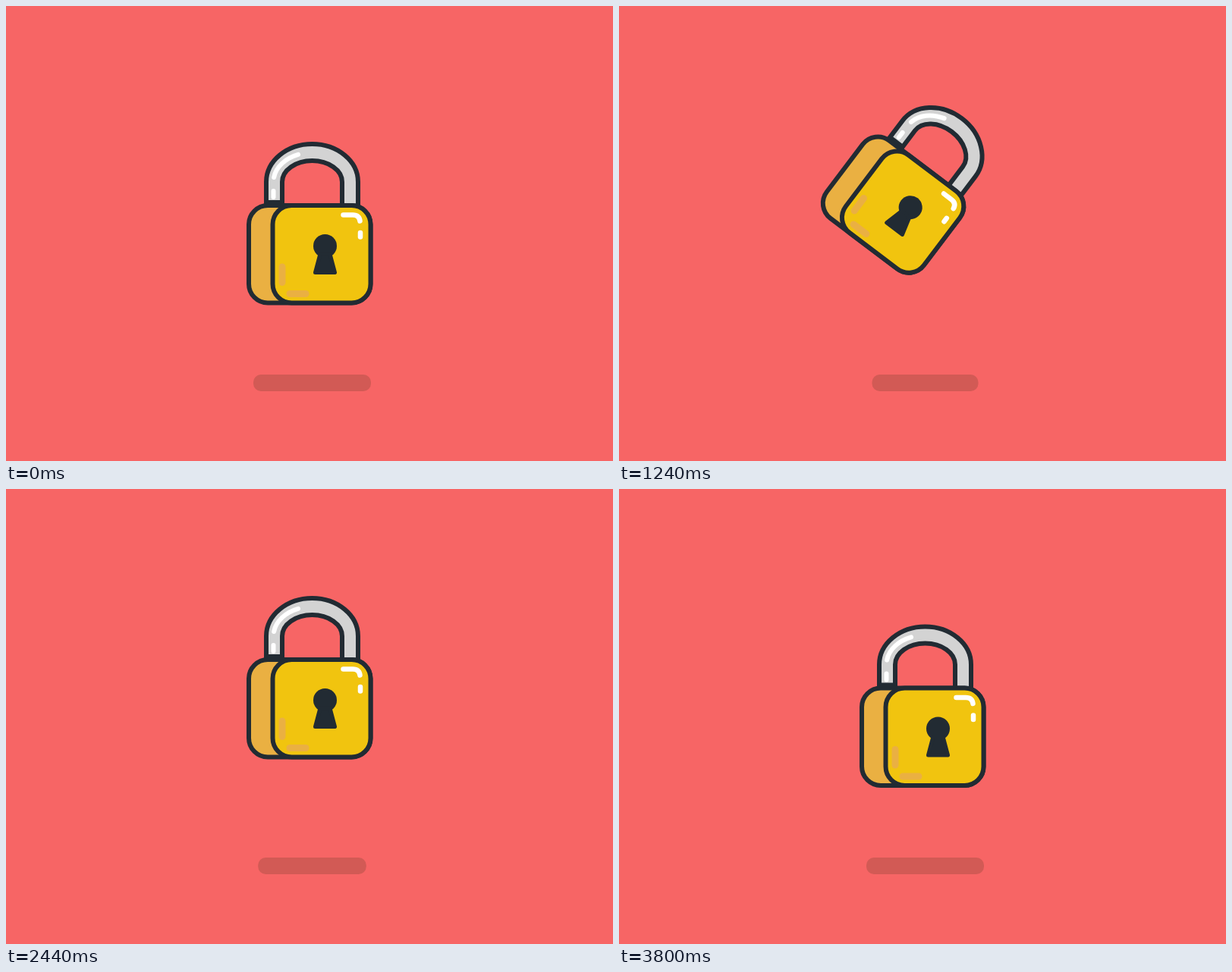
Recreate the animation shown at these times as an HTML page with a canvas. Size 800 px wide and 600 px high, loop 3840 ms.

```html
<!DOCTYPE html>
<html lang="en">
<head>
<meta charset="utf-8">
<title>Padlock</title>
<style>
  html, body { margin: 0; width: 100%; height: 100%; overflow: hidden; background: #f76565; }
  canvas { display: block; }
</style>
</head>
<body>
<canvas id="stage" width="800" height="600"></canvas>
<script>
const ctx = document.getElementById('stage').getContext('2d');
const LOOP = 3840, STEP = 40;
const INK = '#222b33', GOLD = '#f1c40f', AMBER = '#eab042', STEEL = '#d3d3d3', SHADOW = '#d25a55';

const clamp = u => Math.min(1, Math.max(0, u));
const ease = u => (1 - Math.cos(Math.PI * clamp(u))) / 2;
const rad = deg => deg * Math.PI / 180;

// Smooth curve through [time, value] keys that never overshoots them.
function track(...keys) {
  const slope = keys.slice(1).map((k, i) => (k[1] - keys[i][1]) / (k[0] - keys[i][0]));
  const tangent = keys.map((_, i) => {
    const a = slope[i - 1], b = slope[i];
    return a * b > 0 ? 2 * a * b / (a + b) : 0;
  });
  return t => {
    if (t <= keys[0][0]) return keys[0][1];
    const i = keys.findIndex(k => k[0] > t) - 1;
    if (i < 0) return keys[keys.length - 1][1];
    const [t0, v0] = keys[i], [t1, v1] = keys[i + 1];
    const d = t1 - t0, u = (t - t0) / d, w = 1 - u;
    return v0 * (1 + 2 * u) * w * w + v1 * u * u * (3 - 2 * u)
      + d * u * w * (tangent[i] * w - tangent[i + 1] * u);
  };
}

const tilt = track([980, 0], [1120, 16], [1260, 38], [1460, 4], [1560, -5.6], [1690, -8.3], [2000, -2.2], [2240, 0]);
const recoil = track([1400, 0], [1560, 1.5], [1740, 4], [1990, -4.5], [2240, 0]);
const opening = track([1380, 0], [1540, 22], [1700, 22], [2000, 4.9], [2160, 0]);
const lift = track([1340, 0], [1500, 23], [1700, 23], [2000, -15], [2240, -1], [2360, 0]);
const nudge = track([1700, 0], [2000, 1.5], [2240, 0]);
const gleam = track([1380, 24], [1540, 64], [1700, 64], [2000, 51], [2300, 24]);

const height = t => 50 * (ease(t / 1090) - ease((t - 1713) / 2231));

function rotateAbout(x, y, deg) {
  ctx.translate(x, y);
  ctx.rotate(rad(deg));
  ctx.translate(-x, -y);
}

function roundRect(x, y, w, h, r, fill, outlined) {
  ctx.beginPath();
  ctx.roundRect(x, y, w, h, r);
  ctx.fillStyle = fill;
  ctx.fill();
  if (outlined) outline();
}

function outline() {
  ctx.strokeStyle = INK;
  ctx.lineWidth = 6;
  ctx.lineCap = 'butt';
  ctx.lineJoin = 'miter';
  ctx.stroke();
}

function line(color, width, x0, y0, x1, y1) {
  ctx.beginPath();
  ctx.moveTo(x0, y0);
  ctx.lineTo(x1, y1);
  strokeRound(color, width);
}

function strokeRound(color, width) {
  ctx.strokeStyle = color;
  ctx.lineWidth = width;
  ctx.lineCap = ctx.lineJoin = 'round';
  ctx.stroke();
}

function drawShackle(t) {
  ctx.save();
  ctx.translate(nudge(t), 0);
  rotateAbout(455, 267, opening(t));
  ctx.translate(0, -lift(t));

  ctx.beginPath();
  ctx.moveTo(343, 259);
  ctx.ellipse(403.5, 232, 60.5, 50, 0, Math.PI, 0);
  ctx.lineTo(464, 310);
  ctx.lineTo(443, 310);
  ctx.ellipse(403.5, 232, 39.5, 28, 0, 0, Math.PI, true);
  ctx.lineTo(364, 259);
  ctx.closePath();
  ctx.fillStyle = STEEL;
  ctx.fill();
  outline();

  // One highlight along the bar, split by a gap that slides.
  const gap = gleam(t);
  ctx.beginPath();
  ctx.moveTo(352.5, 252);
  ctx.ellipse(402.5, 232, 50, 38.5, 0, Math.PI, 1.6 * Math.PI);
  ctx.setLineDash([gap - 16, 18, 70 - gap, 999]);
  strokeRound('#fff', 6);
  ctx.setLineDash([]);
  ctx.restore();
}

function drawBody() {
  roundRect(320, 263, 160.5, 128.5, 25, AMBER, true);
  roundRect(351.5, 263, 129, 128.5, 25, GOLD, true);

  line(AMBER, 9, 364, 344, 364, 364.5);
  line(AMBER, 9, 374, 379.5, 395, 379.5);

  ctx.beginPath();
  ctx.moveTo(444.5, 275.5);
  ctx.lineTo(457, 275.5);
  ctx.quadraticCurveTo(465.5, 275.5, 466.5, 283.5);
  strokeRound('#fff', 6.5);
  line('#fff', 6.5, 467, 299, 467, 304.5);

  ctx.fillStyle = INK;
  ctx.beginPath();
  ctx.arc(420.5, 316.5, 15.5, 0, 2 * Math.PI);
  ctx.fill();
  ctx.beginPath();
  ctx.moveTo(414, 327);
  ctx.lineTo(427, 327);
  ctx.lineTo(433.5, 351.5);
  ctx.lineTo(407.5, 351.5);
  ctx.closePath();
  ctx.fill();
  strokeRound(INK, 5);
}

function draw(t) {
  ctx.fillStyle = '#f76565';
  ctx.fillRect(0, 0, 800, 600);

  const width = 155 - 15 * (ease(t / 1150) - ease((t - 1920) / 1920));
  roundRect(403.5 - width / 2, 486, width, 22, 10, SHADOW);

  ctx.save();
  ctx.translate(0, recoil(t) - height(t));
  const angle = tilt(t);
  // Swings about the middle one way and about the hinge the other way.
  if (angle > 0) rotateAbout(403.5, 262, angle);
  else rotateAbout(455, 257, angle);
  drawShackle(t);
  drawBody();
  ctx.restore();
}

const start = performance.now();
function tick() {
  const t = (performance.now() - start) % LOOP;
  draw(Math.floor(t / STEP) * STEP);
  requestAnimationFrame(tick);
}
tick();
</script>
</body>
</html>
```
